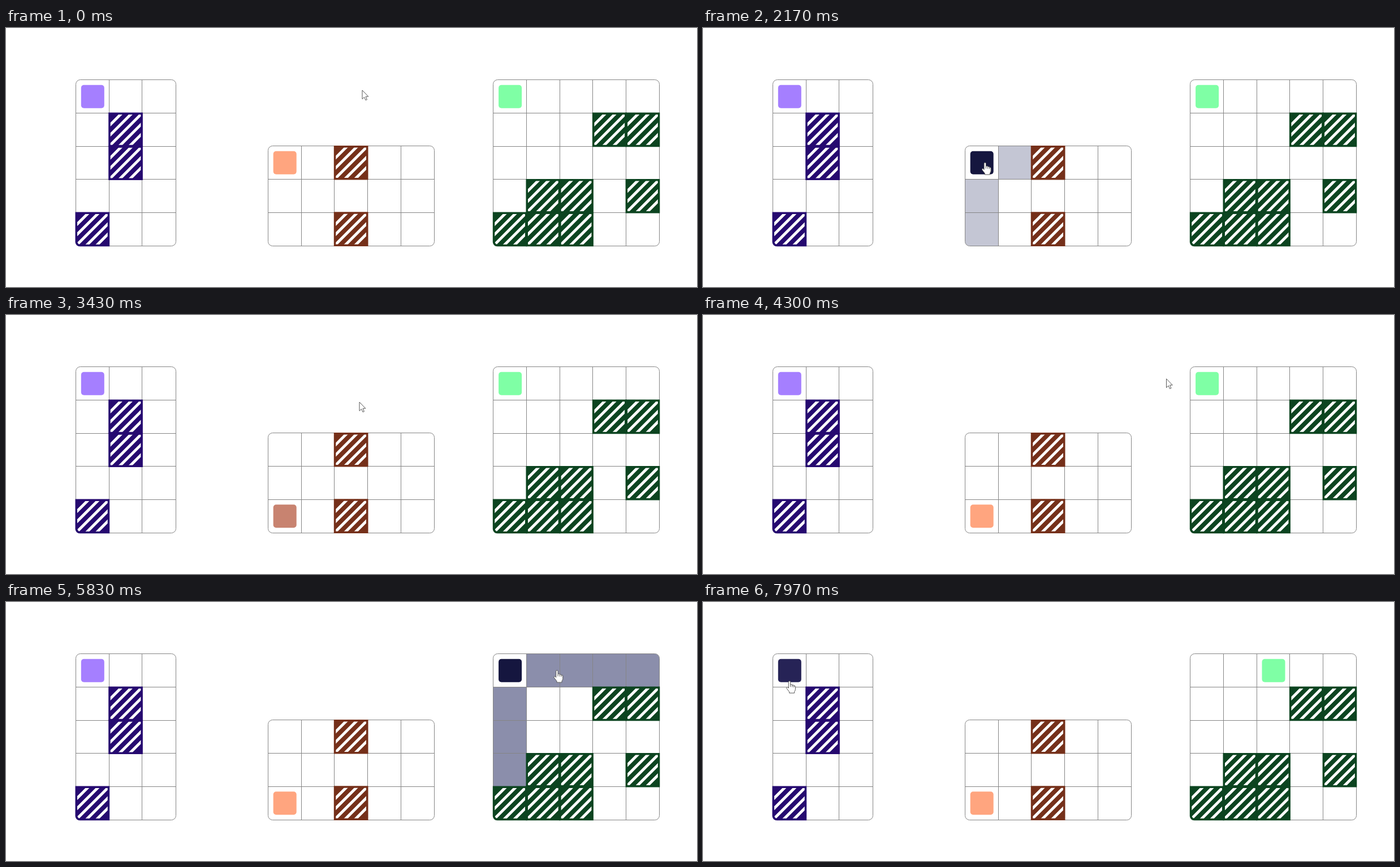
Recreate the animation shown at these times as an HTML page with a canvas. Size 1222 px wide and 458 px high, loop 8 s.

```html
<!DOCTYPE html>
<html lang="en">
<head>
<meta charset="utf-8">
<title>Sliding pieces</title>
<style>
html, body { margin: 0; width: 100%; height: 100%; overflow: hidden; background: #fff; }
canvas { display: block; }
</style>
</head>
<body>
<canvas id="stage" width="1222" height="458"></canvas>
<script>
const ctx = document.getElementById('stage').getContext('2d');
const LOOP = 8000, CELL = 58.7, FADE = 400, RADIUS = 8;
const NAVY = [21, 22, 63], WHITE = [255, 255, 255], TINT = [139, 142, 171];

// In a map, # is a wall. Times: hover, pick and drop the piece, leave it.
const purple = {
  x: 123.5, y: 91.8, color: [165, 127, 255], wall: '#260a70',
  map: ['...', '.#.', '.#.', '...', '#..'],
  from: [0, 0], hover: 7710
};
const orange = {
  x: 463.4, y: 208.9, color: [255, 165, 127], wall: '#75301a',
  map: ['..#..', '.....', '..#..'],
  from: [0, 0], to: [0, 2], aim: 6, hover: 1640, pick: 2050, drop: 2950, leave: 3225
};
const green = {
  x: 861.8, y: 91.8, color: [127, 255, 165], wall: '#0c4420',
  map: ['.....', '...##', '.....', '.##.#', '###..'],
  from: [0, 0], to: [2, 0], aim: -5, hover: 4690, pick: 5200, drop: 6000, leave: 6390
};
const boards = [purple, orange, green];

for (const b of boards) {
  b.cols = b.map[0].length;
  b.rows = b.map.length;
  b.moves = slides(b);
}

// Pointer stops: time, x, y
const path = [
  [0, 630, 110], [800, 602, 106], [1470, 478, 101],
  ...visit(orange),
  [3430, 625, 154], [4200, 813, 112],
  ...visit(green),
  [6500, 595, 107], [7570, 252, 188], [7970, 153, 140], [LOOP, 153, 140]
];

// Cells a piece can reach in a straight line before a wall
function slides(b) {
  const cells = [];
  for (const [dc, dr] of [[1, 0], [-1, 0], [0, 1], [0, -1]]) {
    let [c, r] = b.from;
    while (b.map[r += dr]?.[c += dc] === '.') cells.push([c, r]);
  }
  return cells;
}

function visit(b) {
  const stop = (t, cell) => {
    const [x, y] = cellPos(b, cell);
    return [t, x + CELL / 2 + b.aim, y + CELL / 2];
  };
  return [stop(b.hover + 60, b.from), stop(b.drop - 520, b.from),
    stop(b.drop, b.to), stop(b.leave - 30, b.to)];
}

function cellPos(b, [c, r]) {
  return [b.x + c * CELL, b.y + r * CELL];
}

function pieceCell(b, t) {
  return t >= b.drop ? b.to : b.from;
}

const clamp = p => Math.min(1, Math.max(0, p));
const smooth = p => p * p * (3 - 2 * p);
const snap = v => Math.floor(v) + 0.5;
const lerp = (a, b, k) => a + (b - a) * k;

// Quick start, soft landing
function ramp(t, start = Infinity) {
  return smooth(clamp((t - start) / FADE) ** 0.57);
}

function fade(t, start, end) {
  return ramp(t, start) * (1 - ramp(t, end));
}

function mix(a, b, k) {
  return `rgb(${a.map((v, i) => Math.round(lerp(v, b[i], k))).join(',')})`;
}

function pointerAt(t) {
  const i = path.findIndex(stop => stop[0] > t);
  const [t0, x0, y0] = path[i - 1], [t1, x1, y1] = path[i];
  const k = smooth((t - t0) / (t1 - t0));
  return [lerp(x0, x1, k), lerp(y0, y1, k)];
}

function box(x, y, w, h, r) {
  ctx.beginPath();
  ctx.roundRect(x, y, w, h, r);
}

function drawWall(b, cell) {
  const [x, y] = cellPos(b, cell);
  const corner = cell[0] === 0 && cell[1] === b.rows - 1 ? RADIUS : 0;
  ctx.save();
  ctx.fillStyle = b.wall;
  box(x - 1, y - 1, CELL + 2, CELL + 2, [0, 0, 0, corner]);
  ctx.fill();
  box(x + 2.5, y + 2.5, CELL - 5, CELL - 5, [0, 0, 0, corner * 0.7]);
  ctx.clip();
  ctx.strokeStyle = '#fff';
  ctx.lineWidth = 4.9;
  ctx.beginPath();
  for (let k = -2; k <= 2; k++) {
    const s = CELL + k * 18;
    ctx.moveTo(x + s + 10, y - 10);
    ctx.lineTo(x - 10, y + s + 10);
  }
  ctx.stroke();
  ctx.restore();
}

function drawGrid(b) {
  const left = snap(b.x), right = snap(b.x + b.cols * CELL + 0.4);
  const top = snap(b.y), bottom = snap(b.y + b.rows * CELL + 0.4);
  ctx.strokeStyle = '#858585';
  ctx.lineWidth = 1;
  box(left, top, right - left, bottom - top, RADIUS);
  for (let c = 1; c < b.cols; c++) {
    const x = snap(b.x + c * CELL);
    ctx.moveTo(x, top);
    ctx.lineTo(x, bottom);
  }
  for (let r = 1; r < b.rows; r++) {
    const y = snap(b.y + r * CELL);
    ctx.moveTo(left, y);
    ctx.lineTo(right, y);
  }
  ctx.stroke();
}

function drawMoves(b, t) {
  ctx.save();
  box(b.x, b.y, b.cols * CELL, b.rows * CELL, RADIUS);
  ctx.clip();
  ctx.fillStyle = mix(WHITE, TINT, fade(t, b.pick, b.drop));
  for (const cell of b.moves) ctx.fillRect(...cellPos(b, cell), CELL, CELL);
  ctx.restore();
}

function drawBoard(b, t) {
  drawMoves(b, t);
  drawGrid(b);
  b.map.forEach((row, r) => [...row].forEach((mark, c) => {
    if (mark === '#') drawWall(b, [c, r]);
  }));
  const [x, y] = cellPos(b, pieceCell(b, t));
  ctx.fillStyle = mix(b.color, NAVY, fade(t, b.hover, b.leave));
  box(x + 9.3, y + 8.9, 41, 41, 5);
  ctx.fill();
}

function isClickable(x, y, t) {
  return boards.some(b => {
    const inside = (cell, pad) => cellPos(b, cell).every((start, i) => {
      const offset = (i ? y : x) - start;
      return offset >= pad && offset <= CELL - pad;
    });
    const open = t >= b.pick && t < b.drop;
    return inside(pieceCell(b, t), 8.9) || (open && b.moves.some(cell => inside(cell, 0)));
  });
}

const arrow = new Path2D('M0 0V15.6L3.6 12.2 6 17.6 8.4 16.6 6.1 11.2H10.8Z');
const hand = new Path2D('M-1.7 1.4Q-1.7-.2 0-.2T1.7 1.4V6Q4.5 5 4.9 7Q7.4 6 7.8 8.1' +
  'Q10.2 7.4 10.4 10V14.5Q10.2 17 8.6 18.5V21H-.4V18.8L-5.2 12.6Q-5.7 11.2-4.6 10.5T-1.7 12.2Z');
const fingers = new Path2D('M1.7 6V10.3M4.9 7V10.6M7.8 8V11');

function drawPointer(t) {
  const [x, y] = pointerAt(t);
  const over = isClickable(x, y, t), shape = over ? hand : arrow;
  ctx.save();
  ctx.translate(x, y);
  ctx.lineJoin = 'round';
  ctx.lineWidth = 1;
  ctx.fillStyle = '#fff';
  ctx.strokeStyle = '#555';
  ctx.fill(shape);
  ctx.stroke(shape);
  if (over) ctx.stroke(fingers);
  ctx.restore();
}

function draw(t) {
  ctx.fillStyle = '#fff';
  ctx.fillRect(0, 0, 1222, 458);
  for (const b of boards) drawBoard(b, t);
  drawPointer(t);
}

const begin = performance.now();
function tick() {
  draw((performance.now() - begin) % LOOP);
  requestAnimationFrame(tick);
}
tick();
</script>
</body>
</html>
```
